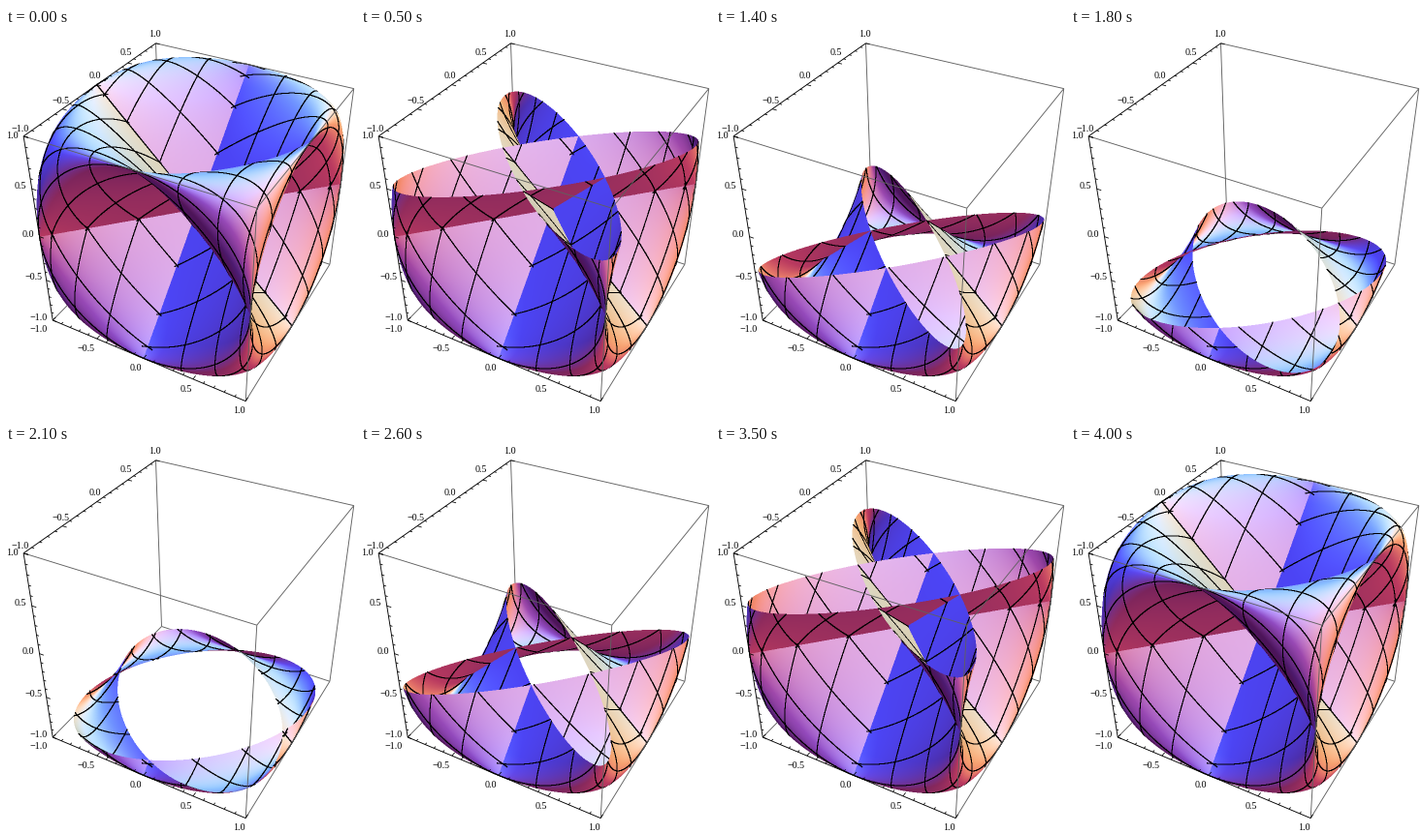
Write a matplotlib script that moves like this. It is 360 px wide and 402 px high and loops after 4100 ms.

```python
import itertools

import matplotlib.pyplot as plt
import numpy as np
from matplotlib.animation import FuncAnimation

W, H, DPI = 360, 402, 64
SS = 2               # supersampling of the rendered surface
GRID = 2600          # samples per surface parameter
STEPS = 20           # frames from the full surface to the empty box
PX = 72 / DPI        # one pixel in points

# Perspective camera looking at the centre of the cube [-1, 1]^3
EYE = np.array([2.6, -4.8, 4.0])
DIST = np.linalg.norm(EYE)
BACK = EYE / DIST
RIGHT = np.cross([0, 0, 1], BACK)
RIGHT /= np.linalg.norm(RIGHT)
UP = np.cross(BACK, RIGHT)
ZOOM, CX, CY = 774, 197.4, 187.0

AMBIENT = (0.30, 0.08, 0.35)
# light direction as (right, up, towards the viewer), colour
LIGHTS = [((-0.5, 1.5, 1.5), (0.00, 0.24, 0.77)),
          ((0.60, 0.70, 0.38), (0.32, 0.60, 0.10)),
          ((1.5, -0.5, 1.5), (0.51, 0.175, 0.03))]


def dot(axis, p):
    return axis[0] * p[0] + axis[1] * p[1] + axis[2] * p[2]


def project(p):
    depth = DIST - dot(BACK, p)
    return (CX + ZOOM * dot(RIGHT, p) / depth,
            CY - ZOOM * dot(UP, p) / depth, depth)


def sine_surface(u, v):
    return np.sin(u), np.sin(v), np.sin(u + v)


def shade(u, v, p):
    """Two-sided diffuse shading, packed as one RGBA word per sample."""
    cu, cv, cw = np.cos(u), np.cos(v), np.cos(u + v)
    n = np.array([-cw * cv, -cu * cw, cu * cv])
    view = [EYE[k] - p[k] for k in range(3)]
    n *= np.sign(dot(n, view)) / (np.sqrt(dot(n, n)) + 1e-9)
    rgba = np.full(u.shape + (4,), 255, np.uint8)
    rgb = [np.full(u.shape, a) for a in AMBIENT]
    for (r, up, t), colour in LIGHTS:
        d = r * RIGHT + up * UP + t * BACK
        lit = np.maximum(dot(d / np.linalg.norm(d), n), 0)
        for k in range(3):
            rgb[k] += colour[k] * lit
    for k in range(3):
        rgba[..., k] = np.clip(rgb[k], 0, 1) * 255
    return rgba.view(np.uint32)[..., 0]


def cell(x, y):
    return (y.astype(np.int32) * (W * SS) + x.astype(np.int32)).ravel()


def surface_samples():
    t = (np.arange(GRID) + 0.5) * 2 * np.pi / GRID
    for rows in np.array_split(t, 20):
        u, v = np.meshgrid(rows, t, indexing="ij")
        p = sine_surface(u, v)
        x, y, depth = project(p)
        yield (cell(x * SS, y * SS), depth.ravel().astype(np.float32),
               p[2].ravel().astype(np.float32), shade(u, v, p).ravel())


def mesh_samples():
    black = np.array([0, 0, 0, 255], np.uint8).view(np.uint32)[0]
    lines = np.arange(1, 16) * np.pi / 8
    along = np.linspace(0, 2 * np.pi, 3500)
    a, b = np.meshgrid(lines, along, indexing="ij")
    for u, v in ((a, b), (b, a)):
        p = sine_surface(u, v)
        x, y, depth = project(p)
        near = (depth - 0.03).ravel().astype(np.float32)
        z = p[2].ravel().astype(np.float32)
        for dx, dy in itertools.product((-0.5, 0.5), repeat=2):
            yield (cell(x * SS + dx, y * SS + dy), near, z,
                   np.full(z.size, black, np.uint32))


def build_cloud():
    parts = list(itertools.chain(surface_samples(), mesh_samples()))
    cells, depth, z, colour = (np.concatenate(c) for c in zip(*parts))
    order = np.argsort(-depth)      # far to near, the nearest is written last
    return cells[order], z[order], colour[order]


CELLS, HEIGHTS, COLOURS = build_cloud()
cache = {}


def render(step):
    """Surface below the cutting height of this step as an RGBA image."""
    if step not in cache:
        keep = HEIGHTS < 1 - 2 * step / STEPS
        buf = np.zeros(W * SS * H * SS, np.uint32)
        buf[CELLS[keep]] = COLOURS[keep]
        px = buf.view(np.uint8).reshape(H, SS, W, SS, 4)
        total = px.sum(axis=(1, 3), dtype=np.float64)
        alpha = total[..., 3:]
        rgb = total[..., :3] / np.maximum(alpha, 1)
        cache[step] = np.concatenate([rgb, alpha / (255 * SS * SS)], axis=2)
    return cache[step]


fig = plt.figure(figsize=(W / DPI, H / DPI), dpi=DPI, facecolor="white")
ax = fig.add_axes([0, 0, 1, 1])


def segment(p, q, colour, width, zorder):
    x, y, _ = project(np.array([p, q], float).T)
    ax.plot(x, y, color=colour, lw=width * PX, zorder=zorder,
            solid_capstyle="butt")


def draw_box():
    corners = list(itertools.product((-1, 1), repeat=3))
    axes = [{(-1, -1, -1), (1, -1, -1)}, {(-1, -1, 1), (-1, 1, 1)},
            {(-1, -1, -1), (-1, -1, 1)}]
    for p, q in itertools.combinations(corners, 2):
        if sum(a != b for a, b in zip(p, q)) != 1:
            continue
        hidden = (-1, 1, -1) in (p, q)
        colour = "black" if {p, q} in axes else "#606060"
        segment(p, q, colour, 0.9, 1 if hidden else 3)


def draw_ticks(start, axis, inward):
    for k in range(-10, 11):
        p = np.array(start, float)
        p[axis] = k / 10
        q = p.copy()
        q[inward] += 0.045 if k % 5 == 0 else 0.025
        segment(p, q, "black", 0.8, 4)


def draw_labels(places):
    for value, (x, y) in zip(np.arange(-1, 1.1, 0.5), places):
        text = f"{value:.1f}".replace("-", "\u2212")
        ax.text(x, y, text, family="Liberation Serif", fontsize=10 * PX,
                ha="center", va="center", zorder=5)


draw_box()
draw_ticks((0, -1, -1), 0, 1)
draw_ticks((-1, 0, 1), 1, 0)
draw_ticks((-1, -1, 0), 2, 0)
draw_labels([(34, 312), (82, 331), (134, 352), (185.5, 373), (240, 396)])
draw_labels([(15, 104.5), (57, 75), (92, 49), (124, 26), (153.5, 6.5)])
draw_labels([(34, 299), (28, 258), (23, 213), (14.5, 163.5), (6.5, 111.5)])

picture = ax.imshow(render(0), extent=(0, W, H, 0), interpolation="nearest",
                    aspect="auto", zorder=2)
ax.set_xlim(0, W)
ax.set_ylim(H, 0)
ax.axis("off")


def update(i):
    picture.set_data(render(min(i, 2 * STEPS - i)))
    return [picture]


anim = FuncAnimation(fig, update, frames=2 * STEPS + 1, interval=100,
                     repeat=True, repeat_delay=0, blit=False)
plt.show()
```
